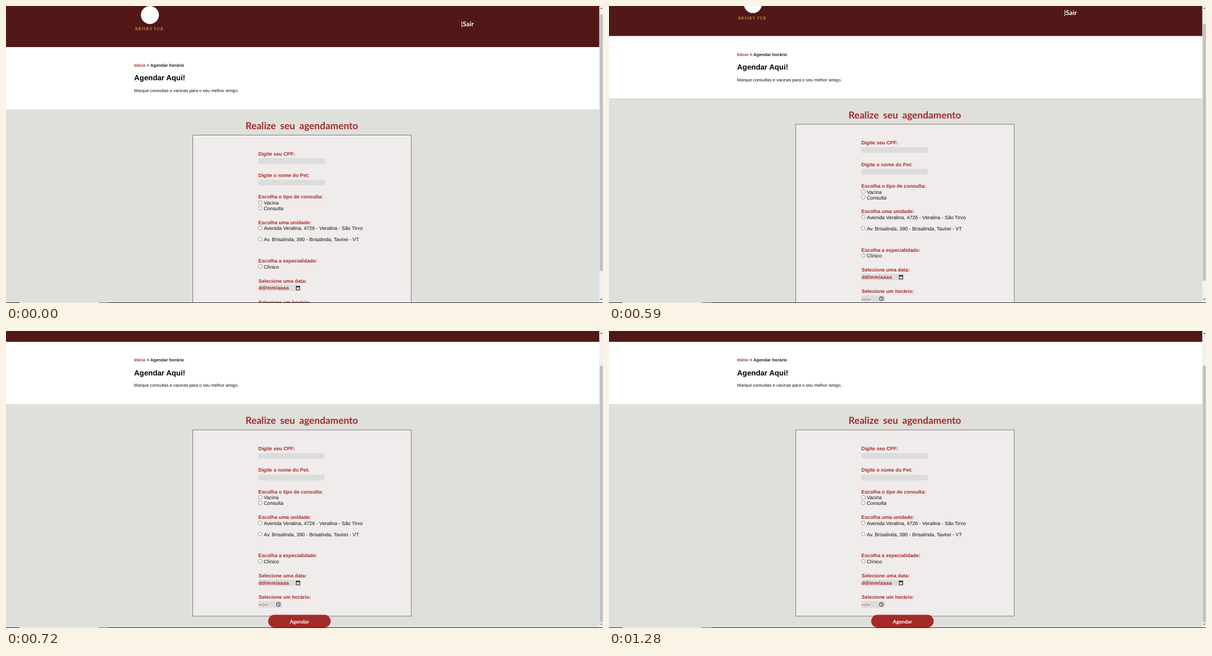
These frames come from a looping animation (1060 px wide and 528 px high, 1390 ms). An HTML page with a canvas:

```html
<!DOCTYPE html>
<html lang="pt-BR">
<head>
<meta charset="utf-8">
<title>Agendar horário</title>
<style>
  html, body { margin: 0; width: 100%; height: 100%; overflow: hidden; background: #dfe0dc; }
  canvas { display: block; width: 1060px; height: 528px; }
</style>
</head>
<body>
<canvas id="stage" width="1060" height="528"></canvas>
<script>
const ctx = document.getElementById("stage").getContext("2d");
const W = 1060, H = 528, LOOP = 1390;
const PAGE_W = 1053.6;
const ZOOM = W / 1920; // the page is shown scaled down from 1920 px
const SANS = '"Liberation Sans", Arial, sans-serif';
const SERIF = '"Noto Serif", serif';
const ROUND = 'Lato, sans-serif';
const RED = "#a52a2a", FIELD = "#dcdcdc", INK = "#111";

// [start time, page scroll]: one wheel turn, held between repaints
const SCROLL = [[0, 0], [520, 1], [590, 19.4], [650, 47], [720, 53.6]];

function scrollAt(t) {
  let y = 0;
  for (const [start, value] of SCROLL) if (t >= start) y = value;
  return y;
}

function rect(x, y, w, h, color, radius = 0) {
  ctx.fillStyle = color;
  ctx.beginPath();
  ctx.roundRect(x, y, w, h, radius);
  ctx.fill();
}

function disc(x, y, r, fill, stroke, width) {
  ctx.beginPath();
  ctx.arc(x, y, r, 0, Math.PI * 2);
  if (fill) { ctx.fillStyle = fill; ctx.fill(); }
  if (stroke) { ctx.strokeStyle = stroke; ctx.lineWidth = width; ctx.stroke(); }
}

function line(points, color, width) {
  ctx.beginPath();
  points.forEach(([x, y]) => ctx.lineTo(x, y));
  ctx.strokeStyle = color;
  ctx.lineWidth = width;
  ctx.stroke();
}

// Draws text at a stage position with its size in page pixels; returns its stage width.
function text(str, x, y, { size = 16, color = INK, weight = 400, family = SANS,
                           align = "left", spacing = 0, words = 0 } = {}) {
  ctx.save();
  ctx.translate(x, y);
  ctx.scale(ZOOM, ZOOM);
  ctx.font = `${weight} ${size}px ${family}`;
  ctx.textRendering = "geometricPrecision";
  ctx.letterSpacing = spacing + "px";
  ctx.wordSpacing = words + "px";
  ctx.textAlign = align;
  ctx.fillStyle = color;
  ctx.fillText(str, 0, 0);
  const width = ctx.measureText(str).width * ZOOM;
  ctx.restore();
  return width;
}

function label(str, y, x = 448) {
  text(str, x, y, { weight: 700, color: RED });
}

function radio(str, y) {
  disc(451.5, y - 3.6, 3.3, "#fff", "#767676", 0.75);
  text(str, 457.7, y);
}

function header() {
  rect(0, 0, PAGE_W, 73, "#521818");
  disc(255.5, 16, 16, "#fff");
  text("BRISKY FUR", 229.5, 43.4, { size: 13, color: "#e2b04e", family: SERIF, spacing: 1.6 });
  text("|Sair", 808, 35.8, { size: 21, weight: 700, color: "#fff", family: ROUND });
}

function intro() {
  rect(0, 73, PAGE_W, 110.5, "#fff");
  const small = { size: 14, weight: 700 };
  const w = text("Início", 227.5, 108, { ...small, color: RED });
  text(" > Agendar horário", 227.5 + w, 108, { ...small, color: "#222" });
  text("Agendar Aqui!", 227.5, 132.2, { size: 24, weight: 700, color: "#000" });
  text("Marque consultas e vacinas para o seu melhor amigo.", 227.5, 153, { size: 14 });
}

function calendarIcon(x, y) {
  ctx.strokeStyle = INK;
  ctx.lineWidth = 0.9;
  ctx.strokeRect(x - 3.1, y - 2.8, 6.2, 6.3);
  rect(x - 3.5, y - 3.2, 7, 1.9, INK);
  rect(x - 2.4, y - 4, 0.9, 1, INK);
  rect(x + 1.5, y - 4, 0.9, 1, INK);
}

function clockIcon(x, y) {
  disc(x, y, 3.5, null, INK, 0.9);
  line([[x, y - 2.2], [x, y + 0.2], [x + 1.7, y + 1.3]], INK, 0.8);
}

function form() {
  text("Realize seu agendamento", 525.2, 218.9,
    { size: 31.2, weight: 700, color: RED, family: ROUND, align: "center", words: 6 });

  rect(331.6, 229.5, 387.8, 331, "#f0eceb");
  ctx.strokeStyle = "#707070";
  ctx.lineWidth = 0.9;
  ctx.strokeRect(331.6, 229.5, 387.8, 331);

  label("Digite seu CPF:", 265.6);
  rect(448, 270.6, 118, 10, FIELD, 2.7);
  label("Digite o nome do Pet:", 304);
  rect(448, 309, 118, 10, FIELD, 2.7);

  label("Escolha o tipo de consulta:", 342.3);
  radio("Vacina", 352.9);
  radio("Consulta", 362.9);

  label("Escolha uma unidade:", 387.7);
  radio("Avenida Veralina, 4726 - Veralina - São Tirvo", 398.2);
  radio("Av. Brisalinda, 390 - Brisalinda, Tavirei - VT", 418.2);

  label("Escolha a especialidade:", 456);
  radio("Clínico", 466.5);

  const value = { weight: 700, color: RED, spacing: 0.5 };
  label("Selecione uma data:", 491.5, 448.5);
  rect(448, 495.6, 75.5, 11.2, FIELD, 1.5);
  text("dd/mm/aaaa", 448.5, 504.2, value);
  calendarIcon(518.4, 501.3);

  label("Selecione um horário:", 529.7, 448.5);
  rect(448, 533.8, 42, 11.6, FIELD, 1.5);
  text("--:--", 448.5, 542.9, value);
  clockIcon(483.5, 539.7);

  rect(465.5, 558.2, 111, 22.4, RED, 11.2);
  text("Agendar", 521, 573.6,
    { size: 16.5, weight: 700, color: "#fff", family: ROUND, align: "center" });
}

function arrow(y, dir) {
  ctx.fillStyle = "#505050";
  ctx.beginPath();
  ctx.moveTo(1055, y);
  ctx.lineTo(1059, y);
  ctx.lineTo(1057, y + 2.2 * dir);
  ctx.fill();
}

function scrollbar(scroll) {
  rect(PAGE_W, 0, W - PAGE_W, H, "#f1f1f1");
  rect(1054.2, 15 + scroll * 0.87, 5.6, 456, "#c1c1c1");
  arrow(5, -1);
  arrow(520.5, 1);
}

function taskbar() {
  rect(0, 527, W, 1, "#262626");
  rect(24, 527, 141, 1, "#ececec");
  rect(165, 527, 17, 1, "#77776f");
}

function draw(t) {
  const scroll = scrollAt(t);
  rect(0, 0, W, H, "#dfe0dc");
  ctx.save();
  ctx.translate(0, -scroll);
  header();
  intro();
  form();
  ctx.restore();
  scrollbar(scroll);
  taskbar();
}

const start = performance.now();
function tick() {
  draw((performance.now() - start) % LOOP);
  requestAnimationFrame(tick);
}
tick();
</script>
</body>
</html>
```
